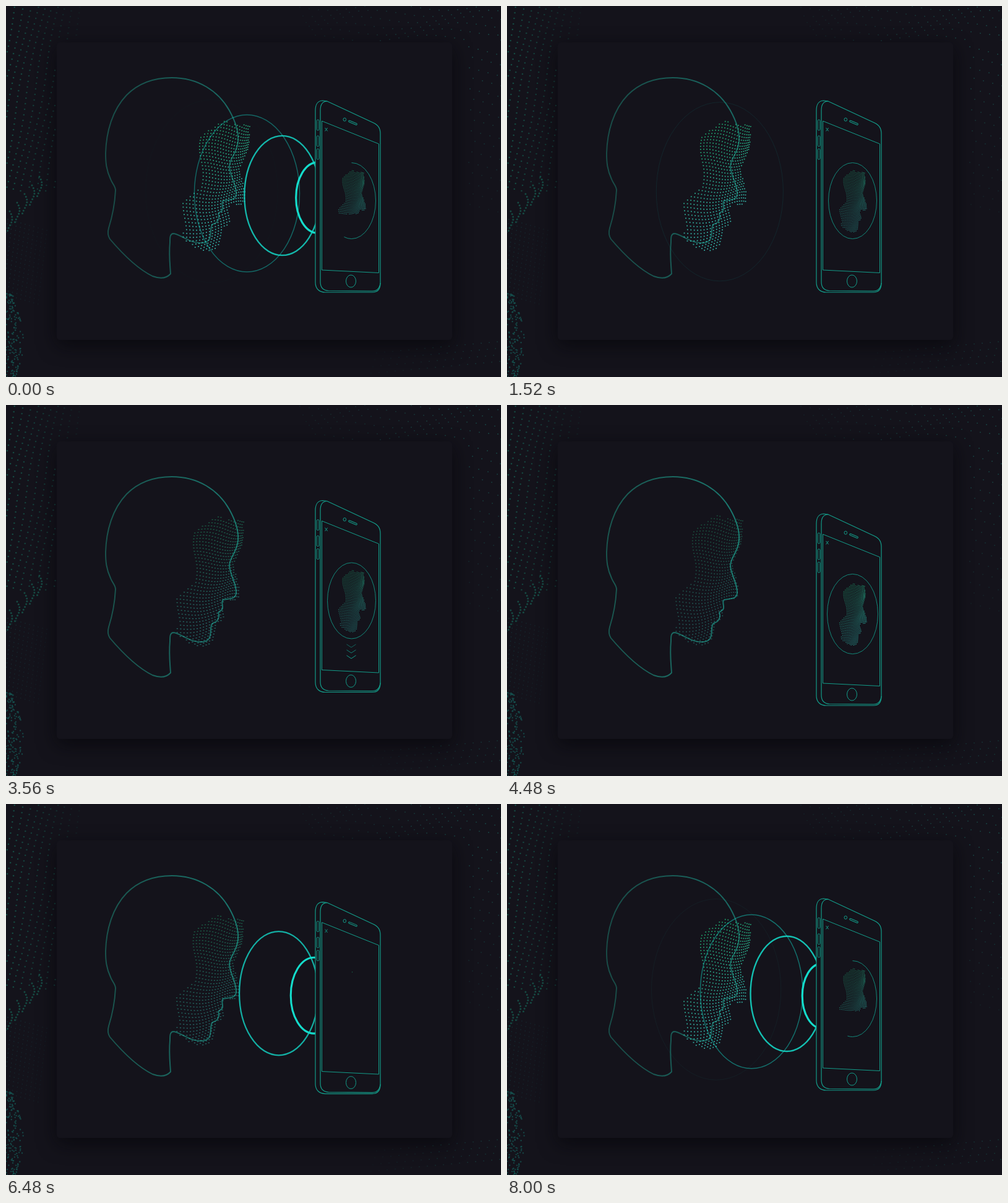
Recreate the animation shown at these times as an HTML page with a canvas. Size 800 by 600 pixels, loop 8040 ms.

```html
<!DOCTYPE html>
<html lang="en">
<head>
<meta charset="utf-8">
<title>Face scan</title>
<style>
  html, body { margin: 0; width: 100%; height: 100%; overflow: hidden; background: #14131b; }
  canvas { display: block; width: 800px; height: 600px; }
</style>
</head>
<body>
<canvas id="stage" width="800" height="600"></canvas>
<script>
const LOOP = 8040, STEP = 40, BG = '#14131b', LINE = '#139c89';
const ctx = document.getElementById('stage').getContext('2d');

const clamp = v => Math.max(0, Math.min(1, v));
const linear = (t, a, b) => clamp((t - a) / (b - a));
const ease = (t, a, b) => (1 - Math.cos(Math.PI * linear(t, a, b))) / 2;

function seeded(seed) {
  return () => (seed = (seed * 16807) % 2147483647) / 2147483647;
}

const head = new Path2D(`M268 116 C310 116 343 137 361 169 C371 187 376 203 375 218
  C374 238 361 246 361 260 C362 275 372 287 372 303 C372 314 362 313 351 315
  C347 318 351 323 350 329 C349 333 344 333 343 336 C345 340 344 345 341 349
  C338 353 333 351 332 356 C330 363 332 372 328 378 C322 386 305 384 292 377
  C283 373 276 368 270 368 C265 369 265 374 265 382 C263 402 265 417 266 433
  C259 441 248 441 237 437 C212 425 185 397 168 377 C164 371 164 366 166 359
  C172 340 176 317 177 298 C177 291 172 288 169 280 C162 265 161 253 161 238
  C162 203 172 168 195 144 C215 124 240 116 268 116 Z`);

const faceMask = new Path2D(`M309 214 L352 184 L362 190 L394 192 L393 225 L385 248 L379 262
  L383 285 L388 302 L387 319 L373 323 L362 319 L361 330 L364 340 L359 356 L350 361
  L347 371 L345 389 L334 395 L320 398 L304 391 L280 371 L291 357 L287 342 L282 320
  L298 307 L313 291 L318 268 L312 247 Z`);

// Warped grid: columns crowd towards the profile, rows tilt from brow to chin.
const faceDots = [];
for (let r = 0; r < 48; r++) {
  for (let c = 0; c < 28; c++) {
    const s = c / 27;
    const x = 278 + 117 * (1 - Math.pow(1 - s, 1.3)) + 3 * Math.sin(r * 0.38);
    const y = 170 + r * 5.1 + 4 * Math.sin(c * 0.3 + r * 0.16) + (s - 0.5) * (16 - r * 0.95);
    if (ctx.isPointInPath(faceMask, x, y)) faceDots.push([x, y]);
  }
}

function shade(x0, y0, x1, y1, from, to) {
  const g = ctx.createLinearGradient(x0, y0, x1, y1);
  g.addColorStop(0, from);
  g.addColorStop(1, to);
  return g;
}
const headInk = shade(170, 0, 372, 0, '#1a5750', '#1a7a71');
const faceInk = shade(306, 195, 380, 320, '#1c9a60', '#34b1a6');
const screenInk = shade(536, 270, 580, 330, '#178a58', '#2aa89e');

function makeBackdrop() {
  const cv = document.createElement('canvas');
  cv.width = 800;
  cv.height = 600;
  const g = cv.getContext('2d'), rnd = seeded(77);
  const dot = (x, y, r, a, color) => {
    g.globalAlpha = a;
    g.fillStyle = color;
    g.beginPath();
    g.arc(x, y, r, 0, 7);
    g.fill();
  };
  g.fillStyle = '#14131b';
  g.fillRect(0, 0, 800, 600);

  g.fillStyle = BG;
  g.shadowColor = 'rgba(6,6,10,.7)';
  g.shadowBlur = 30;
  g.shadowOffsetY = 9;
  g.beginPath();
  g.roundRect(82, 59, 639, 481, 5);
  g.fill();
  g.shadowColor = 'transparent';

  // Hanging strings of dots on the left
  for (let k = 0; k < 13; k++) {
    for (let y = 2 + (k % 3) * 3; y < 300; y += 9) {
      const x = 14 + k * 12 - y * 0.2 + 3 * Math.sin(y / 38 + k * 0.6);
      const edge = y < 55 ? 125 : 80;
      if (x > 0 && x < edge) dot(x, y, 1.3, 0.95 - x / 150, '#165047');
    }
  }
  for (let k = 0; k < 5; k++) {
    for (let i = 0; i < 8; i++) {
      const x = 6 + k * 12 + 4 * Math.sin(i * 0.6);
      dot(x, 332 - k * 14 + i * 4.5, 1.5, 0.8, '#17594e');
    }
  }
  for (let k = 0; k < 10; k++) {
    for (let y = 345; y < 470; y += 7) {
      const x = 3 + k * 7 - (y - 345) * 0.12;
      if (x > 0) dot(x, y + k * 2, 0.8, 0.6 - k * 0.04, '#1b4c50');
    }
  }
  for (let i = 0; i < 150; i++) {
    const y = 465 + rnd() * 135;
    dot(rnd() * (10 + 18 * Math.sin((y - 465) / 50)), y, 1.2, 0.75, '#175553');
  }

  // Sparse field along the top, right and bottom
  for (let i = 0; i < 24; i++) {
    for (let j = 0; j < 6; j++) {
      const x = 475 + i * 15 + j * 5, y = 2 + j * 10 + 5 * Math.sin(i * 0.5 + j);
      if (y < 56) dot(x, y, 0.9, 0.2 + i * 0.028, '#1b5f5a');
    }
  }
  for (let i = 0; i < 4; i++) {
    for (let y = 66; y < 330; y += 17) {
      dot(748 + i * 15 + (y % 11), y + i * 4, 0.9, 0.8 * (1 - y / 420), '#1b5f5a');
    }
  }
  for (let i = 0; i < 17; i++) {
    for (let j = 0; j < 4; j++) {
      dot(590 + i * 13 + j * 3, 594 - j * 11 - i * 1.2, 0.8, 0.15 + i * 0.03, '#1b5f5a');
    }
  }
  return cv;
}
const backdrop = makeBackdrop();

function line(...pts) {
  ctx.beginPath();
  pts.forEach(([x, y]) => ctx.lineTo(x, y));
  ctx.stroke();
}

function oval(x, y, rx, ry, sweep = 1) {
  ctx.beginPath();
  ctx.ellipse(x, y, rx, ry, 0, -Math.PI / 2, -Math.PI / 2 + sweep * Math.PI * 2);
  ctx.stroke();
}

function drawFace(back) {
  const w = 1.8 + 0.6 * Math.sin(back * Math.PI), h = 3.5 - w;
  ctx.save();
  ctx.translate(-13 * back, -7.5 * back);
  ctx.globalAlpha = 1 - 0.6 * back;
  ctx.fillStyle = faceInk;
  for (const [x, y] of faceDots) ctx.fillRect(x - w / 2, y - h / 2, w, h);
  ctx.restore();
}

// Seven rings leave the phone, 400 ms apart.
function drawRings(t) {
  ctx.strokeStyle = '#14dccb';
  for (let k = 0; k < 7; k++) {
    const age = (t - 5580 - k * 400 + 2 * LOOP) % LOOP;
    if (age > 1680) continue;
    const d = age * 0.1425;
    const ry = 0.964 * d - 0.00143 * d * d;
    const rx = ry * (0.6 + 0.1 * Math.pow(d / 215, 2));
    ctx.globalAlpha = clamp((1680 - age) / 1000);
    ctx.lineWidth = Math.max(0.9, Math.min(3.2, 4.2 - age * 0.0022));
    oval(569 - d, 314 - d * 0.061, rx, ry);
  }
  ctx.globalAlpha = 1;
}

const phoneBody = new Path2D(`M500 169 C500 158 505 153 512 153 L519 154 L594 189
  C602 193 605 198 605 207 L605 448 C605 458 601 463 592 463 L516 463
  C506 463 500 457 500 447 Z`);
const phoneFront = new Path2D(`M519 154 C512 154 508 159 508 169 L508 446
  C508 455 513 460 521 460.5 L592 461 C600 461 604 456 605 448`);

function drawPhone() {
  ctx.fillStyle = BG;
  ctx.strokeStyle = LINE;
  ctx.lineWidth = 1.2;
  ctx.fill(phoneBody);
  ctx.stroke(phoneBody);
  ctx.stroke(phoneFront);
  ctx.lineWidth = 1;
  line([510.5, 186], [602.5, 223], [602.5, 431.5], [510.5, 427], [510.5, 186]);
  oval(557.5, 445, 8, 10);
  oval(547.3, 183.6, 2.3, 2.6);
  for (const y of [184, 210, 231]) {
    ctx.beginPath();
    ctx.roundRect(502.3, y, 3.6, 17, 1.5);
    ctx.stroke();
  }
  ctx.save();
  ctx.translate(560.5, 188.8);
  ctx.rotate(0.4);
  ctx.beginPath();
  ctx.roundRect(-7.3, -1.2, 14.6, 2.4, 1.2);
  ctx.stroke();
  ctx.restore();
}

function drawScreen(T) {
  const scanning = T > 6000;
  const fade = scanning ? 1 : 1 - ease(T, 4950, 5700);
  const cross = T > 5900 ? ease(T, 6100, 6600) : 1 - ease(T, 5100, 5800);
  ctx.strokeStyle = LINE;
  ctx.lineWidth = 1;

  ctx.globalAlpha = cross;
  line([515.6, 197], [519.6, 202.4]);
  line([519.6, 197], [515.6, 202.4]);

  const sweep = scanning ? linear(T, 6720, 9120) : 1;
  const grow = scanning ? 1 : 1 + 0.055 * ease(T, 4150, 4550);
  ctx.globalAlpha = 0.85 * fade;
  if (sweep > 0) oval(558.5, 315, 39 * grow, 61.5 * grow, sweep);

  const limit = scanning ? 265 + 102 * linear(T, 6450, 8720) : 400;
  ctx.globalAlpha = fade * (scanning ? 0.8 : 0.8 + 0.2 * ease(T, 3400, 4400));
  ctx.fillStyle = screenInk;
  for (const [x, y] of faceDots) {
    const sx = 533.6 + (x - 281) * 0.44 + (y - 290) * 0.055;
    const sy = 265.5 + (y - 185) * 0.475;
    if (sy < limit) ctx.fillRect(sx - 0.5, sy - 0.55, 1.1, 1.1);
  }

  const bob = 3 * (1 - Math.cos((T - 1800) / 880 * Math.PI * 2));
  for (let i = 0; i < 3 && T < 4400; i++) {
    ctx.globalAlpha = (0.6 + 0.2 * i) * ease(T, 1800 + i * 100, 2100 + i * 100) * (1 - ease(T, 3800, 4300));
    const y = 385.5 + i * 9 + bob;
    line([550.5, y], [558, y + 5], [565.5, y]);
  }
  ctx.globalAlpha = 1;
}

function draw(t) {
  // The scan runs across the loop seam, so early times count as its tail.
  const T = t < 1800 ? t + LOOP : t;
  const back = T < 5000 ? ease(T, 2360, 4160) : 1 - ease(T, 5960, 7640);
  const drop = 34.5 * (T < 5270 ? ease(T, 3300, 5240) : 1 - ease(T, 5300, 6900));

  ctx.drawImage(backdrop, 0, 0);
  ctx.strokeStyle = headInk;
  ctx.lineWidth = 1.9;
  ctx.globalAlpha = 0.85 + 0.15 * back;
  ctx.stroke(head);
  ctx.globalAlpha = 1;
  drawFace(back);
  drawRings(t);

  ctx.save();
  ctx.translate(0, drop);
  drawPhone();
  drawScreen(T);
  ctx.restore();
}

const start = performance.now();
function tick() {
  const t = (performance.now() - start) % LOOP;
  draw(Math.floor(t / STEP) * STEP);
  requestAnimationFrame(tick);
}
tick();
</script>
</body>
</html>
```
